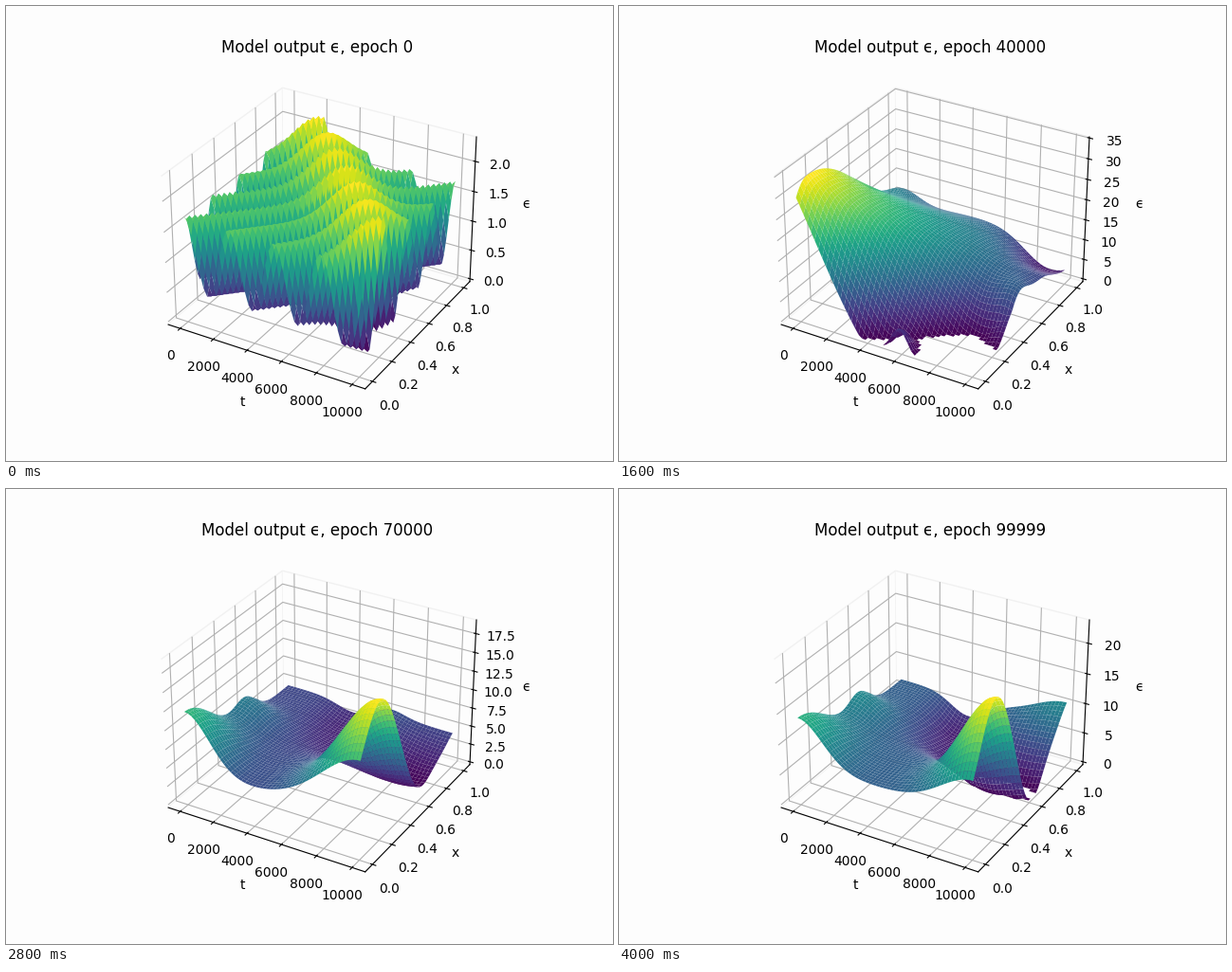
A matplotlib script that plays this animation: 640x480 px, repeating every 4.1 s.

```python
import numpy as np
import matplotlib.pyplot as plt
from matplotlib.animation import FuncAnimation
from mpl_toolkits.mplot3d.art3d import Poly3DCollection

FRAMES = 41
N = 50
T_MAX = 10000
PAPER = (0.992, 0.992, 0.992, 1)

axis_pts = np.linspace(0, 1, N)
S, V = np.meshgrid(axis_pts, axis_pts)   # scaled t and x


def bump(s0, v0, ws, wv):
    return np.exp(-((S - s0) / ws) ** 2 - ((V - v0) / wv) ** 2)


def ripples():
    """Untrained output: diagonal waves, strongest along the other diagonal."""
    band = np.exp(-((S + V - 1.17) / 0.25) ** 2)
    wave = np.cos(2 * np.pi * (S - V) / 0.26)
    return 0.48 + 0.05 * band + (0.27 + 0.18 * band) * wave


def two_walls():
    """A leaning hump in front and a two-part wall behind."""
    lean = 0.2 * (S - 0.36)
    hump = 1.05 * np.exp(-((S - 0.38) / 0.38) ** 2 - ((V - lean) / 0.25) ** 2)
    toe = 0.36 * bump(0.88, 0, 0.12, 0.15)
    wall = (bump(0.52, 1.02, 0.2, 0.18) + 0.5 * bump(0.2, 1, 0.25, 0.25)
            + 0.95 * bump(-0.02, 0.66, 0.3, 0.24))
    pit = 0.2 * bump(0.2, 0.35, 0.35, 0.2)
    return 0.05 + hump + toe + wall - pit


def slope(front, back):
    """A ridge falling from the near-left corner, steep towards the viewer."""
    q = V - 0.1 - 0.7 * S
    near = np.maximum(np.cos(np.pi * q / front), -0.2)
    far = np.exp(-(q / back) ** 2)
    return np.exp(-S / 0.75) * np.where(q < 0, near, far)


def corner_ridge():
    return (slope(0.62, 0.55) + 0.15 * bump(0, 1, 0.15, 0.2)
            + 0.25 * bump(0.62, 1, 0.12, 0.2)
            + 0.3 * bump(0.5, 0, 0.08, 0.12)
            + 0.6 * bump(1, 0.25, 0.12, 0.13)
            - 0.3 * bump(1.05, 0.75, 0.15, 0.25))


def long_slope():
    return (slope(0.7, 0.75) + 0.13 * bump(0, 1, 0.15, 0.2)
            + 0.25 * bump(0.58, 0, 0.08, 0.12)
            + 0.25 * bump(1, 0.45, 0.15, 0.15)
            - 0.2 * bump(0.9, 1, 0.2, 0.25))


def late_peak():
    return (0.2 + 0.5 * bump(0, 0, 0.2, 0.35)
            + 0.15 * bump(0, 0.55, 0.2, 0.15)
            + 0.8 * bump(1, 0.15, 0.35, 0.3)
            + 0.1 * bump(0.62, 1, 0.12, 0.2)
            - 0.2 * bump(1, 0.95, 0.25, 0.35))


def settled():
    return (0.3 + 0.33 * bump(0, 0, 0.2, 0.35)
            + 0.15 * bump(0, 0.57, 0.2, 0.14)
            + 0.7 * bump(1, 0.22, 0.25, 0.22)
            + 0.2 * bump(1, 1.05, 0.25, 0.15)
            - 0.4 * bump(0.85, 0.62, 0.4, 0.17)
            - 0.2 * bump(0.42, 0.88, 0.15, 0.2))


def scaled(field, peak):
    return field * (peak / field.max())


# (frame, surface) stages of the training, blended in between
stages = [
    (0, scaled(ripples(), 2.24)),
    (6, scaled(two_walls(), 18.6)),
    (12, scaled(corner_ridge(), 30)),
    (16, scaled(long_slope(), 32.9)),
    (24, scaled(late_peak(), 29.2)),
    (28, scaled(late_peak() + settled(), 18)),
    (32, scaled(settled(), 22.2)),
    (36, scaled(settled() + 0.2 * late_peak(), 23.2)),
    (40, scaled(settled(), 22.2)),
]


def surface_at(i):
    for (i0, z0), (i1, z1) in zip(stages, stages[1:]):
        if i <= i1:
            w = (i - i0) / (i1 - i0)
            return (1 - w) * z0 + w * z1


def quads(z):
    """Grid cells above zero; those crossing it are cut off at the floor."""
    p = np.stack([S * T_MAX, V, z], axis=-1)
    cells = np.stack([p[:-1, :-1], p[:-1, 1:], p[1:, 1:], p[1:, :-1]], axis=2)
    cells = cells.reshape(-1, 4, 3)
    cells = cells[(cells[:, :, 2] >= 0).any(axis=1)]
    cells[:, :, 2] = np.maximum(cells[:, :, 2], 0)
    return cells


fig = plt.figure(figsize=(6.4, 4.8), dpi=100, facecolor=PAPER)
ax = fig.add_subplot(projection="3d", facecolor=PAPER)
for axis in (ax.xaxis, ax.yaxis, ax.zaxis):
    axis.set_pane_color(PAPER)
    axis.pane.set_edgecolor("#f1f1f1")

margin = 0.05 + 1.1 / 48
ax.set_xlim(-margin * T_MAX, (1 + margin) * T_MAX)
ax.set_ylim(-margin, 1 + margin)
ax.set_xlabel("t")
ax.set_ylabel("x")
ax.set_zlabel("ϵ")


def draw(i):
    for old in list(ax.collections):
        old.remove()
    cells = quads(surface_at(i))
    mesh = Poly3DCollection(cells, cmap="viridis")
    mesh.set_array(cells[:, :, 2].mean(axis=1))
    ax.add_collection3d(mesh)
    top = 1.05 * cells[:, :, 2].max()
    ax.set_zlim(-top / 48, top * 49 / 48)
    ax.set_title(f"Model output ϵ, epoch {min(2500 * i, 99999)}")
    return [mesh]


anim = FuncAnimation(fig, draw, frames=FRAMES, interval=100,
                     init_func=lambda: draw(0), repeat=True, repeat_delay=0)
plt.show()
```
